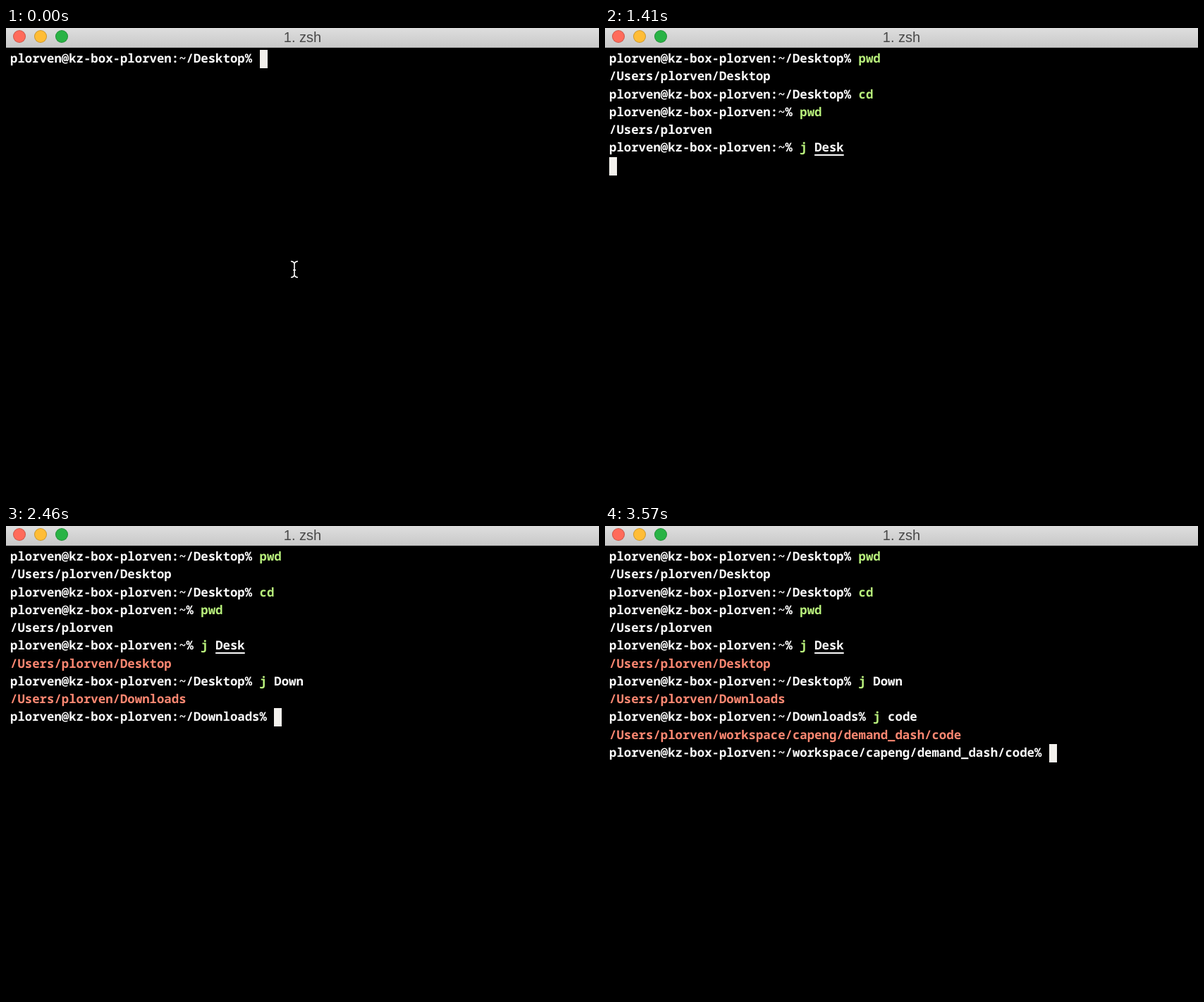
Animation, 841 px wide and 666 px high, one loop 3600 ms. Source, as an HTML page:

```html
<!DOCTYPE html>
<html lang="en">
<head>
<meta charset="utf-8">
<title>1. zsh</title>
<style>
  html, body { margin: 0; width: 100%; height: 100%; overflow: hidden; background: #000; }
  #stage { position: relative; width: 841px; height: 666px; overflow: hidden; background: #000; }
  #bar {
    position: absolute; inset: 0 0 auto; height: 28px; line-height: 26px; box-sizing: border-box;
    background: linear-gradient(#dedede, #c9c9c9); border-bottom: 1px solid #b2b2b2;
    color: #484848; text-align: center;
    font-family: "Liberation Sans", Arial, sans-serif; font-size: 20px;
  }
  #bar i {
    position: absolute; top: 3px; width: 18px; height: 18px; box-sizing: border-box;
    border: 1px solid #0003; border-radius: 50%;
  }
  .row {
    position: absolute; left: 6px; height: 25px; line-height: 25px; white-space: pre;
    color: #fdfdfd; text-rendering: geometricPrecision;
    font-family: "Noto Sans Mono", "DejaVu Sans Mono", monospace;
    font-size: 17.33px; font-weight: 600;
  }
  .cmd { color: #b9f27c; }
  .bad, .out { color: #ff8872; }
  .part { color: #ffe3b0; }
  .path { text-decoration: underline 1.5px; text-underline-offset: 4px; text-decoration-skip-ink: none; }
  .caret { display: inline-block; width: 11px; height: 26px; background: #f3f1ed; vertical-align: top; }
  #beam { position: absolute; left: 402px; top: 329px; }
</style>
</head>
<body>
<div id="stage">
  <div id="bar">
    <i style="left:10px;background:#ff6b5b"></i>
    <i style="left:40px;background:#ffbd36"></i>
    <i style="left:70px;background:#29b345"></i>
    1. zsh
  </div>
  <div id="screen"></div>
  <svg id="beam" width="14" height="26" fill="none" stroke="#fff" stroke-width="1.6">
    <path d="M2 1.5Q7 2 7 6V20Q7 24 2 24.5M12 1.5Q7 2 7 6M7 20Q7 24 12 24.5M5 14H9"/>
  </svg>
</div>
<script>
const LOOP = 3600, FRAME = 30, TOP = 31, PITCH = 25.27;
const user = 'plorven', host = 'kz-box-plorven', home = '/Users/' + user;
const work = '/workspace/capeng/demand_dash/code';

// start: first key, gap: time per key, enter: return pressed, done: next prompt
const runs = [
  { dir: '~/Desktop', text: 'pwd', start: 270, gap: 30, enter: 390, done: 390, out: home + '/Desktop' },
  { dir: '~/Desktop', text: 'cd', start: 630, gap: 60, enter: 780, done: 780 },
  { dir: '~', text: 'pwd', start: 960, gap: 30, enter: 1050, done: 1050, out: home },
  { dir: '~', text: 'j Desk', start: 1170, gap: 30, enter: 1380, done: 1500, out: home + '/Desktop', jump: true },
  { dir: '~/Desktop', text: 'j Down', start: 2010, gap: 30, enter: 2220, done: 2340, out: home + '/Downloads', jump: true },
  { dir: '~/Downloads', text: 'j code', start: 3240, gap: 30, enter: 3420, done: 3510, out: home + work, jump: true },
  { dir: '~' + work, text: '', start: LOOP, gap: 30, enter: LOOP, done: LOOP }
];

const screen = document.getElementById('screen');
const beam = document.getElementById('beam');
const caret = '<span class="caret"></span>';
const span = (cls, text) => `<span class="${cls}">${text}</span>`;

function highlight({ dir, text }, typed) {
  const full = text.split(' ')[0];
  const [word, arg] = typed.split(' ');
  if (!word) return '';
  const atHome = dir === '~';
  const cls = word === full ? 'cmd' : atHome && word.length === 1 ? 'part path' : 'bad';
  const tail = arg === undefined ? '' : ' ' + (atHome && arg ? span('path', arg) : arg);
  return span(cls, word) + tail;
}

function lines(t) {
  const rows = [];
  for (const run of runs) {
    const count = Math.max(0, Math.floor((t - run.start) / run.gap) + 1);
    const line = `${user}@${host}:${run.dir}% ` + highlight(run, run.text.slice(0, count));
    if (t < run.enter) return [...rows, line + caret];
    rows.push(line);
    if (t < run.done) return [...rows, caret];
    if (run.out) rows.push(run.jump ? span('out', run.out) : run.out);
  }
  return rows;
}

let shown = '';
function draw() {
  const t = Math.floor(performance.now() % LOOP / FRAME) * FRAME;
  const html = lines(t).map((line, i) =>
    `<div class="row" style="top:${Math.round(TOP + i * PITCH)}px">${line}</div>`).join('');
  if (html !== shown) screen.innerHTML = shown = html;
  beam.style.display = t < runs[0].start ? 'block' : 'none';
  requestAnimationFrame(draw);
}
draw();
</script>
</body>
</html>
```
